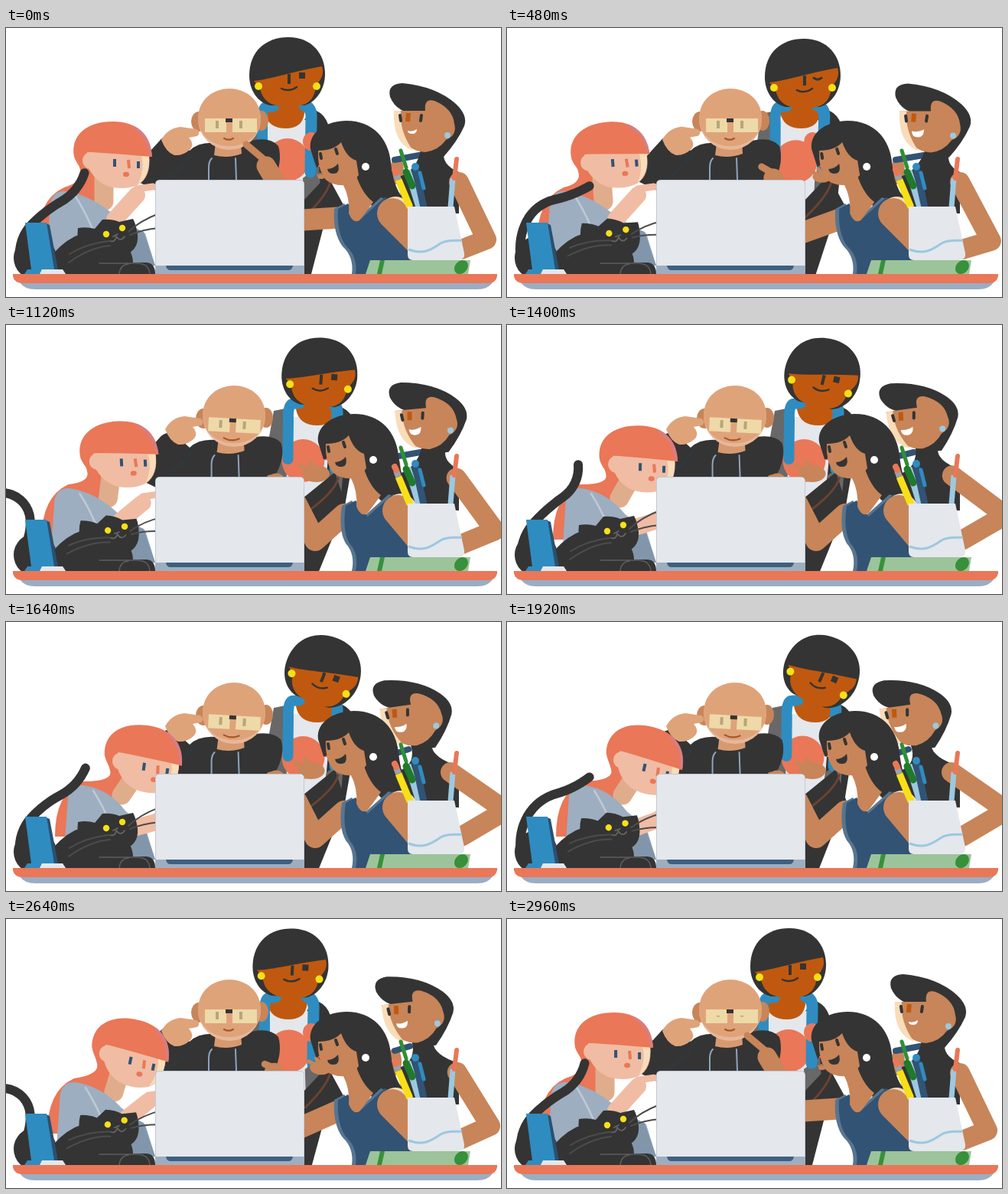
Recreate the animation shown at these times as an HTML page with a canvas. Size 647 by 351 pixels, loop 3000 ms.

```html
<!DOCTYPE html>
<html lang="en">
<head>
<meta charset="utf-8">
<title>Team around a laptop</title>
<style>
html, body { margin: 0; width: 100%; height: 100%; overflow: hidden; background: #fff; }
canvas { display: block; }
</style>
</head>
<body>
<canvas id="stage" width="647" height="351"></canvas>
<script>
const ctx = document.getElementById('stage').getContext('2d');
const LOOP = 3000, CAT_LOOP = 1500, STEP = 40;
const C = {
  dark: '#343434', grey: '#686868', coral: '#ea7757', pale: '#f0bca4', tan: '#dfa37a',
  brown: '#c78559', deep: '#c0590f', blue: '#2f8cc0', navy: '#325374', steel: '#9daec0',
  slate: '#577590', light: '#e4e7ec', sky: '#9cc8e0', yellow: '#f7e017', cream: '#f9dcb8'
};

const lerp = (a, b, u) => a + (b - a) * u;
function ease(a, b, t) {
  const u = Math.min(1, Math.max(0, (t - a) / (b - a)));
  return u * u * (3 - 2 * u);
}
// Rises from a to b, holds, falls from c to d.
const pulse = (t, a, b, c, d) => ease(a, b, t) - ease(c, d, t);

function fill(color, d) {
  ctx.fillStyle = color;
  ctx.fill(new Path2D(d));
}
function line(color, width, d, cap = 'round') {
  ctx.strokeStyle = color;
  ctx.lineWidth = width;
  ctx.lineCap = cap;
  ctx.lineJoin = 'round';
  ctx.stroke(new Path2D(d));
}
function oval(color, x, y, rx, ry = rx, turn = 0) {
  ctx.fillStyle = color;
  ctx.beginPath();
  ctx.ellipse(x, y, rx, ry, turn, 0, Math.PI * 2);
  ctx.fill();
}
function rect(color, x, y, w, h) {
  ctx.fillStyle = color;
  ctx.fillRect(x, y, w, h);
}
function pose(px, py, dx, dy, deg, draw) {
  ctx.save();
  ctx.translate(px + dx, py + dy);
  ctx.rotate(deg * Math.PI / 180);
  ctx.translate(-px, -py);
  draw();
  ctx.restore();
}

function rightFriend(t) {
  const right = pulse(t, 0, 840, 900, 1300);
  const left = pulse(t, 950, 1800, 2500, 2980);
  const raise = pulse(t, 900, 1500, 2000, 2900);
  const grin = pulse(t, 0, 480, 2500, 2960);
  const dx = 10 * right - 19 * left;
  oval(C.brown, 511 - 14 * raise, 186, 9, 18);
  line(C.navy, 8, `M508 172L${540 + dx * .8} 166`);
  fill(C.dark, `M${542 + dx * .8} 158L${573 + dx} 160Q${568 + dx * .6} 178 592 188L592 242H520L512 195Q538 186 ${542 + dx * .8} 158Z`);
  line(C.brown, 26, `M${592 - 11 * raise} ${201 - 5 * raise}L${628 + 8 * right + 25 * raise} ${276 + 3 * right - 30 * raise}L595 ${289 - 9 * raise}`);
  pose(545, 120, dx, right, -8 * pulse(t, 850, 1300, 2500, 2980), () => {
    fill(C.dark, 'M502 90Q498 73 518 72Q562 76 588 99Q604 114 599 128Q590 148 572 168L545 168V112Q512 114 502 90Z');
    fill(C.brown, 'M507 108H548Q546 91 560 95Q584 105 586 125Q590 140 575 146Q565 160 548 162Q512 160 507 108Z');
    fill(C.cream, 'M507 108Q505 150 532 160Q514 135 516 108Z');
    line(C.deep, 6, 'M526 111L525 122', 'butt');
    line(C.dark, 4, 'M515 114L516 121M543 114L542 121');
    const w = 6 + 2 * grin, h = 4 + 4 * grin;
    fill('#fff', `M${531 - w} 134Q531 136 ${531 + w} 132Q${531 + w} ${134 + h} 531 ${134 + h}Q${531 - w} ${134 + h} ${531 - w} 134Z`);
    oval(C.sky, 577, 140, 4);
  });
}

function standingWoman(t, lean) {
  const bx = 34 * lean, mx = 41 * lean;
  const p = (x, y) => `${x + bx * lerp(1, .3, ease(160, 321, y))} ${y}`;
  fill(C.grey, `M${p(336, 108)}L${p(316, 112)}L${p(305, 240)}L${p(345, 240)}Z`);
  fill(C.dark, `M${p(400, 106)}Q${p(425, 112)} ${p(424, 150)}L${p(420, 240)}L${p(399, 321)}L${p(340, 321)}L${p(340, 190)}Z`);
  fill(C.light, `M${p(336, 120)}L${p(392, 120)}L${p(392, 236)}L${p(342, 236)}Z`);
  oval(C.coral, 368 + bx * .6, 172 + 5 * lean, 28);
  fill(C.grey, `M${p(388, 196)}L${p(409, 180)}L${p(412, 224)}L${p(390, 238)}Z`);
  pose(0, 0, mx, 0, 0, () => fill(C.deep, 'M348 88H388L390 112Q387 131 366 131Q342 131 338 110Z'));
  line(C.blue, 14, `M${p(350, 102)}L${p(340, 103)}Q${p(334, 105)} ${p(335, 125)}L${p(335, 175)}`);
  line(C.blue, 15, `M${p(390, 101)}Q${p(400, 104)} ${p(399, 118)}L${p(398, 188)}`);
  pose(368, 76, mx, 4.5 * lean, 24 * pulse(t, 800, 1900, 1950, 2850), () => {
    fill(C.dark, 'M318 62C318 30 340 12 369 12C400 12 417 34 417 60C417 80 405 97 390 101H345C328 97 318 80 318 62Z');
    fill(C.deep, 'M324 69C345 67 370 58 413 50C418 66 405 70 404 82C400 100 385 103 368 103C350 103 335 97 332 78Z');
    line(C.dark, 4, 'M370 60V73', 'butt');
    if (t > 400 && t < 1040) line(C.dark, 3, 'M382 63Q387 67 392 63');
    else rect(C.dark, 383, 58, 8, 8);
    line(C.dark, 2.5, 'M360 79Q370 84 380 77');
    oval(C.yellow, 330, 76, 5);
    oval(C.yellow, 406, 76, 5);
  });
}

function baldMan(t, look, down) {
  const dx = 6 * look;
  const x = v => v + dx * .6;
  fill(C.dark, `M158 194L200 148Q208 138 220 142L240 160Q252 148 275 150H310Q${x(343)} 139 ${x(356)} 154Q${x(362)} 174 350 200H196V212Q180 204 158 194Z`);
  line('#2b3b45', 1.5, 'M245 163Q232 180 210 198');
  fill('#d79a70', `M${x(274)} 150H${x(307)}L${x(308)} 164Q${x(290)} 171 ${x(272)} 166Z`);
  line('#8fa4bd', 2, `M${x(265)} 198V182Q${x(265)} 174 ${x(269)} 170M${x(300)} 170L${x(301)} 198`);
  pose(292, 119, dx, 0, 0, () => {
    oval(C.brown, 252, 122, 10, 13);
    oval(C.brown, 334, 121, 9, 13);
    oval('#e8b799', 292, 119, 41, 40);
    fill(C.tan, 'M251 119C251 66 333 66 333 119C330 166 254 166 251 119Z');
  });
  pose(292, 127, dx * .75, 4 * look, 3 * look, () => {
    rect('#eed9a8', 260, 118, 28, 18);
    rect('#eed9a8', 296, 118, 32, 18);
    rect(C.dark, 287, 118, 9, 5);
    const shut = t > 2900;
    for (const ex of [274, 305]) rect('#b7a57c', ex, shut ? 126 : 121, 4, shut ? 1.5 : 10);
    const w = 6 + 4 * look;
    line('#a4572b', 2.2, `M${291 - w} 144Q291 ${145 + w * .4} ${291 + w} 144`);
  });
  pose(224, 148, 5 * look, -10 * look, 0, () => {
    fill(C.tan, 'M203 146Q211 131 228 129L249 132Q255 136 250 141L239 143Q247 152 240 159Q231 167 220 166Q209 162 203 146Z');
  });
  const px = lerp(340, 353, down), py = lerp(180, 206, down);
  line(C.brown, 9, `M${lerp(314, 345, down)} ${lerp(152, 200, down)}L${px} ${py - 6}`);
  line(C.brown, 25, `M${px} ${py}L${px + 12} ${py + 20}`);
}

function frontWoman(t, look, down) {
  const dx = 10 * look, dy = -5 * look;
  const p = (x, y, o = 0) => `${x + o + dx * (1 - ease(240, 320, y))} ${y}`;
  fill(C.dark, `M388 226L${420 + dx} 192L445 238L407 266L386 252Z`);
  line('#6b4330', 3, `M${424 + dx} 200Q${420 + dx} 218 391 246`);
  oval(C.coral, 399 + dx * 2, 148, 11, 12);
  const reach = pulse(t, 840, 1400, 1950, 2600);
  pose(412, 194, -13 * reach, 0, 0, () => {
    const r = 3 + 8 * down;
    oval(C.brown, 0 + 412, 194, r * 1.6, r);
    line(C.brown, r * .55, `M408 192L${412 - r * 1.8} ${194 - r * .9}M412 190L${412 - r * .7} ${194 - r * 1.3}`);
  });
  const wy = lerp(257 + 17 * down, 234, look);
  line(C.brown, 28, `M442 247L${380 + 24 * look} ${251 + 30 * down}L${350 + 30 * look} ${wy}`);

  pose(0, 0, dx, dy, 0, () => {
    fill(C.dark, 'M398 158C395 135 420 121 445 121C480 121 500 145 503 175C506 205 515 225 536 236L490 242Q465 225 458 195L405 180Z');
  });
  const dress = o => `M${p(429, 236, o)}L${p(442, 229, o)}L${p(458, 250, o)}L${p(490, 221, o)}L${p(535, 236, o)}V321H${452 + o}Q${p(455, 299, o)} ${p(440, 285, o)}Q${p(427, 268, o)} ${p(429, 236, o)}Z`;
  fill(C.slate, dress(0));
  fill(C.navy, dress(5));
  pose(0, 0, dx, dy, 0, () => {
    fill(C.brown, 'M436 195L457 190Q465 216 480 227Q468 244 462 251Q454 256 448 242Q450 222 440 203Z');
    fill(C.brown, 'M408 160Q428 160 438 149Q445 169 458 173L461 192L450 204Q430 208 418 198Q407 185 408 160Z');
    line(C.dark, 4, 'M411 164L412 170M431 158L433 164');
    fill(C.dark, 'M420 184Q428 184 434 177Q437 190 428 190Q421 190 420 184Z');
    line(C.coral, 2, 'M409 180L417 181');
    oval('#fff', 470, 181, 5);
  });
  const s = dx * .7;
  line(C.cream, 40, `M${509 + s} 240L553 282`);
  line(C.brown, 40, `M${505 + s} 242L549 286`);
}

function girl(t) {
  const drift = pulse(t, 0, 800, 800, 1400);
  const duck = pulse(t, 850, 1600, 2350, 2980);
  const nod = pulse(t, 1300, 1900, 2550, 2960);
  const hx = 39 * duck - 6 * drift, hy = 11 * duck + 4 * drift - 4 * nod;
  const g = 23 * duck - 3 * drift;
  fill(C.coral, `M${91 + hx} ${165 + hy}L${128 + hx} ${192 + hy}L${122 + g} 238L${62 + g} 280H${41 + g}Q${41 + g} 224 ${76 + g} 208Q${102 + hx} ${200 + hy} ${97 + hx} ${185 + hy}Z`);
  line('#e0ad8c', 25, `M${128 + hx} ${194 + hy}L${128 + g} 226`);
  fill(C.steel, `M${53 + g} 300L${58 + g} 228Q${62 + g} 212 ${78 + g} 213Q${112 + g} 218 ${145 + g * .5} 247L182 268L195 310H85Z`);
  fill('#8296ab', 'M150 255L180 266L195 310H150Z');
  line('#becad5', 2.5, `M${91 + g} 220Q${102 + g} 237 ${113 + g} 262`);
  const px = 171 + 26 * duck, py = 218 + 47 * duck - 7 * nod;
  line(C.pale, 22, `M${142 + 28 * duck} ${250 + 18 * duck}L${px} ${py}`);
  line(C.pale, 9, `M${px} ${py - 8}L${px + 21} ${py - 11}`);
  pose(111, 173, hx, hy, 13 * nod - 7 * drift, () => {
    fill(C.coral, 'M89 168C84 140 105 122 140 122C170 122 190 138 191 168L120 170V192Q97 190 89 168Z');
    fill(C.pale, 'M106 161L187 166Q190 195 172 205Q155 212 135 207Q115 200 107 180Z');
    fill(C.cream, 'M177 166H187Q189 192 172 205Q182 185 177 166Z');
    oval(C.pale, 111, 173, 11);
    fill(C.coral, 'M95 162Q95 132 130 125Q180 122 191 168Q145 164 112 162Z');
    line('#d67d88', 3.5, 'M166 129Q186 140 189 166', 'butt');
    line(C.navy, 4, 'M142 171V181M173 174V183', 'butt');
    line(C.coral, 4, 'M160 172L161 183', 'butt');
    oval(C.coral, 157, 191, 4, 3.2);
  });
}

// The tail is walked in small steps whose heading bends from root to tip.
function tail(t) {
  const droop = pulse(t, 0, 840, 840, 1140);
  const flip = pulse(t, 840, 1140, 1140, 1500), curl = flip * flip;
  const bend = [95 + 7 * droop - 42 * flip, 45 + 30 * droop + 49 * curl,
    30 - 29 * droop + 142 * curl, 72 - 69 * droop + 122 * flip];
  const steps = 24, size = 146 / steps;
  let x = 18, y = 300, d = `M${x} ${y}`;
  for (let i = 0; i < steps; i++) {
    const s = 3 * (i + .5) / steps, k = Math.floor(s);
    const a = lerp(bend[k], bend[k + 1], s - k) * Math.PI / 180;
    x += size * Math.cos(a);
    y -= size * Math.sin(a);
    d += `L${x} ${y}`;
  }
  line(C.dark, 12, d);
}

function cat(t) {
  tail(t);
  oval(C.dark, 38, 300, 28);
  fill(C.dark, 'M40 321L62 294Q80 274 100 268L150 272Q166 292 166 306H184Q195 307 195 321Z');
  line('#5c5c5c', 1.5, 'M122 307H173Q187 308 188 321M148 321Q149 309 160 308');
  const turn = pulse(t, 100, 840, 840, 1380);
  pose(141.5, 265, 5.5 * turn, turn, 16 * turn, () => {
    fill(C.dark, 'M94 261Q106 259 116 262L126 250Q138 249 148 253L166 249Q170 256 172 270Q174 292 150 298Q115 305 98 288Q92 275 94 261Z');
    oval(C.yellow, 131, 269, 4.2);
    oval(C.yellow, 152, 261, 4.2);
    line('#4c4c4c', 2, 'M160 266Q174 252 200 242M162 270Q178 263 200 261M134 278Q106 281 83 295M136 284Q110 286 82 306');
    line('#666', 1.7, 'M140 272L146 269M144 272Q143 280 136 278M144 272Q150 280 155 272');
  });
}

function desk() {
  // laptop
  fill(C.steel, 'M201 198H384Q390 198 390 204V321H195V204Q195 198 201 198Z');
  fill(C.light, 'M201 198.5H384Q389.5 198.5 389.5 204V310H195.5V204Q195.5 198.5 201 198.5Z');
  fill('#3e6080', 'M209 310H375Q374 316 369 316H215Q210 316 209 310Z');
  // pens
  line(C.sky, 9, 'M525 186L540 234', 'butt');
  line(C.yellow, 9, 'M513 198L528 234', 'butt');
  line('#9aa3ab', 8, 'M510 190L513 198', 'butt');
  line(C.coral, 8, 'M508 185L510 189');
  line('#2f8f35', 5, 'M516 160L523 182');
  line('#1f7a2a', 9, 'M523 188L531 206');
  line(C.navy, 9, 'M535 184L546 234', 'butt');
  oval(C.blue, 535, 181, 5);
  line(C.blue, 5, 'M541 189L546 209');
  line(C.sky, 7, 'M584 196L581 234', 'butt');
  line(C.coral, 6, 'M589 171L586 196');
  // book and cup
  fill('#9cc49a', 'M476 303H607L604 321H470Z');
  fill('#37903a', 'M489 303H495L491 321H485Z');
  oval('#37903a', 595, 312, 10, 8, -.8);
  fill(C.light, 'M525 233H586L599 294Q600 302 592 303H532Q525 303 525 296Z');
  line(C.sky, 3, 'M526 289C545 296 555 290 568 281C578 275 588 278 596 277', 'butt');
  // phone on its stand
  fill('#2b5070', 'M50 254L57 257L68 315H58Z');
  fill(C.blue, 'M25 254H53L63 315H33Z');
  fill(C.blue, 'M28 315H74L78 321H24Z');
  fill(C.light, 'M47 315H74L78 321H44Z');
  // table
  fill('#9aadc4', 'M18 332H636Q630 341 616 341H38Q24 341 18 332Z');
  fill(C.coral, 'M9 321H642V324Q640 333 630 333H22Q11 333 9 324Z');
}

function frame() {
  const t = Math.floor(performance.now() % LOOP / STEP) * STEP;
  const lean = pulse(t, 100, 900, 1700, 2850);
  const look = pulse(t, 450, 840, 1950, 2600);
  const down = pulse(t, 0, 840, 2500, 2960);
  rect('#fff', 0, 0, 647, 351);
  rightFriend(t);
  standingWoman(t, lean);
  baldMan(t, look, down);
  frontWoman(t, look, down);
  girl(t);
  cat(t % CAT_LOOP);
  desk();
  requestAnimationFrame(frame);
}
frame();
</script>
</body>
</html>
```
